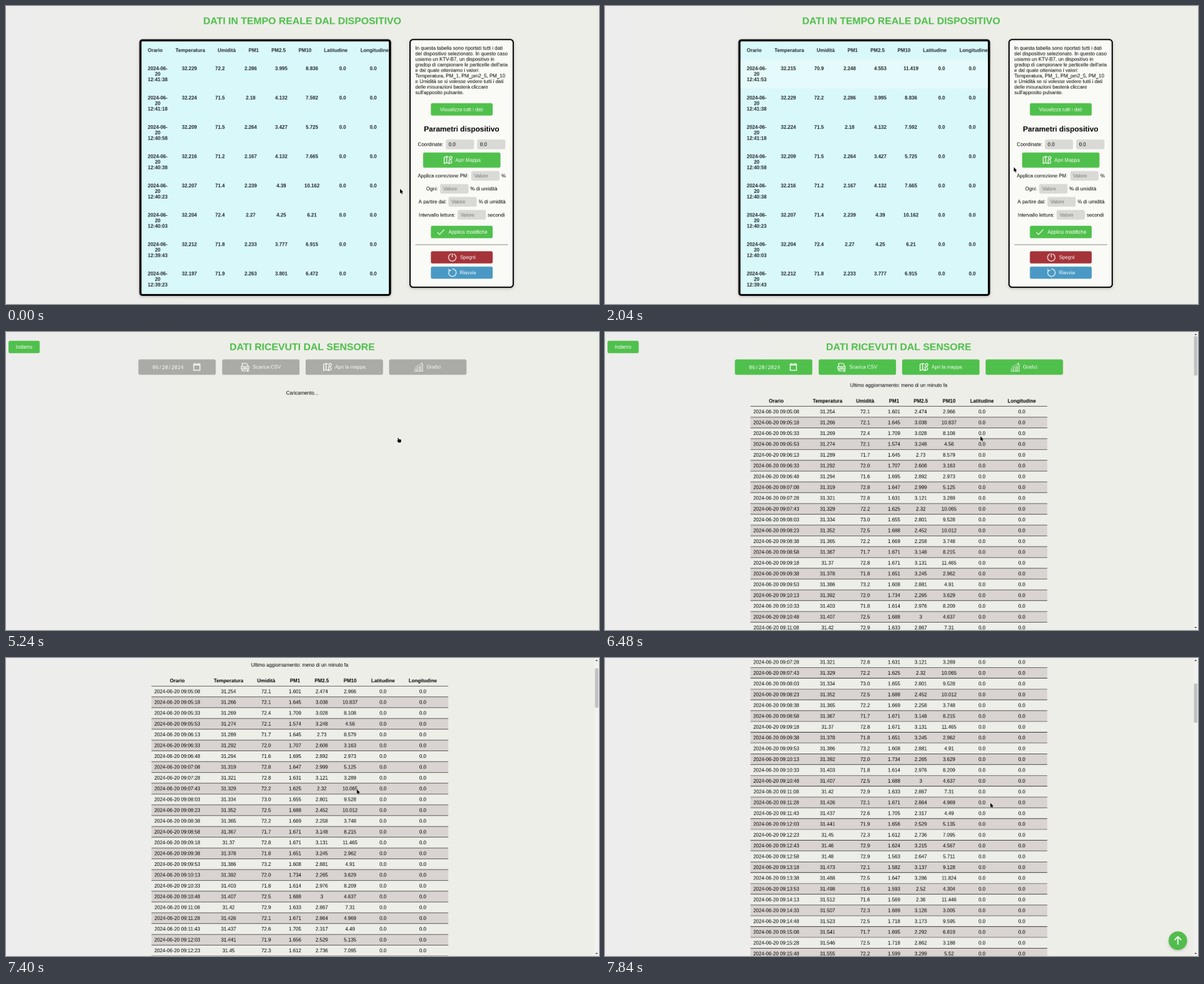
These frames come from a looping animation (954 px wide and 480 px high, 8 s). An HTML page with a canvas:

```html
<!DOCTYPE html>
<html lang="it">
<head>
<meta charset="utf-8">
<title>Dati sensore</title>
<style>
html, body { margin: 0; width: 100%; height: 100%; overflow: hidden; background: #eeeee9; }
canvas { display: block; width: 954px; height: 480px; }
</style>
</head>
<body>
<canvas id="stage" width="954" height="480"></canvas>
<script>
const W = 954, H = 480, LOOP = 8000;
// The page is drawn at full screen size, then reduced to the stage
const SS = 1920 / W, SIZE = 16 / SS;
const SANS = '"Liberation Sans", Arial, sans-serif';
const MONO = '"Noto Sans Mono", "DejaVu Sans Mono", monospace';
const GREEN = '#50c04c', TITLE = '#4abf47', GREY = '#aaaba7', WHITE = '#fafaf8';

const stage = document.getElementById('stage').getContext('2d');
stage.imageSmoothingQuality = 'high';
const page = document.createElement('canvas');
page.width = Math.round(W * SS);
page.height = Math.round(H * SS);
const ctx = page.getContext('2d');

const HEADS = ['Orario', 'Temperatura', 'Umidità', 'PM1', 'PM2.5', 'PM10', 'Latitudine', 'Longitudine'];
const LIVE_HEAD_X = [240, 296.5, 355, 398.5, 438.5, 481, 530.5, 593];
const LOG_X = [275.5, 358, 418.5, 465, 508, 553.5, 606.5, 670.5];
const LOG_ROWS = 36, PITCH = 35 / SS;

const clamp = v => Math.max(0, Math.min(1, v));
const mix = (a, b, p) => a.map((v, i) => v + (b[i] - v) * p);
const rgb = c => `rgb(${c.map(Math.round)})`;

// Repeatable noise in 0..1
function noise(seed) {
  const v = Math.sin(seed * 127.1) * 43758.5453;
  return v - Math.floor(v);
}

const two = n => String(n).padStart(2, '0');
function clock(h, m, s) {
  const all = h * 3600 + m * 60 + s;
  return [all / 3600, all / 60 % 60, all % 60].map(v => two(Math.floor(v))).join(':');
}

// One measurement: drifting temperature, noisy humidity and dust
function reading(time, seed, temp, humidity, dust) {
  const n = k => noise(seed * 5 + k);
  const short = v => String(+v.toFixed(3));
  return [
    time,
    short(temp + (n(1) - 0.5) * 0.02),
    (humidity + n(2) * 1.7).toFixed(1),
    short(dust + n(3) * 0.2),
    short(dust * 2 - 0.9 + n(4) * dust * 0.7),
    short(dust * 3.5 - 2.5 + n(5) ** 2 * 9),
    '0.0', '0.0'
  ];
}

const live = Array.from({ length: 9 }, (_, i) =>
  reading(clock(12, 41, 53 - 5 * Math.floor(3.75 * i)), i + 100, 32.223 - i * 0.002, 70.8, 2.15));
const log = Array.from({ length: LOG_ROWS }, (_, i) =>
  reading('2024-06-20 ' + clock(9, 5, 8 + 5 * Math.max(0, Math.round(3.7 * i - 2))), i + 1, 31.253 + i * 0.0085, 71.5, 1.56));

const INFO = [
  'In questa tabella sono riportati tutti i dati',
  'del dispositivo selezionato. In questo caso',
  'usiamo un KTV-B7, un dispositivo in',
  "gradop di campionare le particelle dell'aria",
  'e dal quale otteniamo i valori:',
  'Temperatura, PM_1, PM_pm2_5, PM_10',
  'e Umidità se si volesse vedere tutti i dati',
  'delle misurazioni basterà cliccare',
  "sull'apposito pulsante."
];

// Icons are centred on 0,0: [path, line width]
const ICONS = {
  map: ['M1 -5 L-2 -6 L-6 -4.5 V5.5 L-2 4 L2 5.5 L6 4 V1 M-2 -6 V4 M2 -1 V5.5 M4.5 0 L2.7 -3 A2 2 0 1 1 6.3 -3 Z', 1.3],
  check: ['M-5.5 0.5 L-2 4 L5.5 -4', 1.2],
  power: ['M-2 -5.6 A6 6 0 1 0 2 -5.6 M0 -6.5 V0', 1.2],
  restart: ['M-4.6 -3.6 A6 6 0 1 0 0 -6 M-6 -6 L-4.6 -3 L-1.6 -4', 1.2],
  calendar: ['M-5 -4.5 H5 V5.5 H-5 Z M-5 -3 H5 M-3 -6 V-4 M3 -6 V-4', 1.3],
  file: ['M-4.5 -1.5 V-6 H2 L4.5 -3.5 V-1.5 M-6 -1 H6 V3 H-6 Z M-4.5 3 V6 H2 M4.5 3 V7 M2.8 5.4 L4.5 7 L6.2 5.4 M-4 1 H4', 1.2],
  chart: ['M-6.5 6.5 V3 H-4 V6.5 M-2.5 6.5 V0.5 H0 V6.5 M1.5 6.5 V-1 H3.5 V6.5 M5 6.5 V-4 H6.7 V6.5 M-7 6.7 H7 M-6 0.5 L-1.5 -2.5 L1 -3 L5.5 -6.5 M3 -6.5 H5.7 V-4', 0.6],
  up: ['M0 6.5 V-6 M-5.5 -0.8 L0 -6.3 L5.5 -0.8', 1.9]
};
for (const k in ICONS) ICONS[k][0] = new Path2D(ICONS[k][0]);
const ARROW = new Path2D('M0 0 V7.3 L1.7 5.8 L2.9 8.5 L4.1 8 L2.9 5.3 H5.2 Z');
const HAND = new Path2D('M0 .4 Q.7 -.4 1.3 .6 L1.8 2.2 L5 2.6 Q6 3 5.7 4.8 L5 7.6 H1.4 L-.9 4.8 Q-.6 3.6 .8 4.5 Z');

// Piecewise linear track of [time, ...values]
function track(keys, t) {
  let i = 0;
  while (i < keys.length - 1 && keys[i + 1][0] <= t) i++;
  const a = keys[i], b = keys[i + 1];
  return b ? mix(a.slice(1), b.slice(1), clamp((t - a[0]) / (b[0] - a[0]))) : a.slice(1);
}

const LIVE_POINTER = [[1920, 634, 294.5], [2280, 705, 190], [2560, 718.5, 166.5]];
const LOG_POINTER = [
  [5240, 630, 170.5], [5320, 604, 168], [6480, 604, 168],
  [7040, 394, 147], [7160, 394, 147], [7400, 564.5, 211.5], [7840, 620, 233.5]
];
const SCROLL = [[6960, 0], [7040, 8.4], [7160, 8.4], [7400, 74.5], [7840, 261]];

function text(str, x, y, o = {}) {
  const size = (o.size || SIZE) * SS;
  ctx.save();
  ctx.setTransform(1, 0, 0, 1, 0, 0);
  ctx.font = `${o.bold ? 'bold ' : ''}${size}px ${o.font || SANS}`;
  ctx.letterSpacing = `${o.spacing || 0}px`;
  ctx.textAlign = o.align || 'center';
  ctx.fillStyle = o.color || '#000';
  ctx.fillText(str, x * SS, Math.round(y * SS + size * 0.345));
  ctx.restore();
}
const left = (str, x, y, color) => text(str, x, y, { align: 'left', color });

function rect(x, y, w, h, fill) {
  ctx.fillStyle = fill;
  ctx.fillRect(x, y, w, h);
}

function box(x, y, w, h, r, fill) {
  ctx.beginPath();
  ctx.roundRect(x, y, w, h, r);
  ctx.fillStyle = fill;
  ctx.fill();
}

function withShadow(draw) {
  ctx.save();
  ctx.shadowColor = 'rgba(0,0,0,.2)';
  ctx.shadowBlur = 4 * SS;
  ctx.shadowOffsetY = 1.5 * SS;
  draw();
  ctx.restore();
}

function icon(name, x, y) {
  const [path, width] = ICONS[name];
  ctx.save();
  ctx.translate(x, y);
  ctx.strokeStyle = WHITE;
  ctx.lineWidth = width;
  ctx.stroke(path);
  ctx.restore();
}

function button(x, y, w, h, fill, label, textX, iconName, iconX) {
  box(x, y, w, h, 2.5, fill);
  const cy = y + h / 2;
  if (iconName) {
    icon(iconName, iconX, cy);
    left(label, textX, cy, WHITE);
  } else text(label, textX, cy, { color: WHITE });
}

function field(x, y, value, color) {
  box(x, y - 7.8, 45.5, 15.5, 2.5, '#d9d9d6');
  left(value, x + 4.7, y, color);
}

function title(str, x, y) {
  text(str, x, y, { size: SIZE * 2, bold: true, color: TITLE });
}

function background() {
  const g = ctx.createLinearGradient(0, 0, W, 0);
  g.addColorStop(0, '#ededed');
  g.addColorStop(0.2, '#ededec');
  g.addColorStop(0.3, '#eeeee9');
  rect(0, 0, W, H + 1, g);
}

function liveTable(t) {
  withShadow(() => box(214.5, 53.5, 405, 413.5, 5, '#000'));
  box(218, 57, 398, 407, 1.5, '#d9f8fa');
  if (t >= 880) {
    const p = clamp((t - 1400) / 920);
    rect(218, 86, 398, 47, rgb(mix([255, 255, 251], [217, 248, 250], p)));
  }
  ctx.save();
  ctx.beginPath();
  ctx.rect(218, 57, 398, 407);
  ctx.clip();
  const ink = { bold: true, color: '#212529' };
  HEADS.forEach((h, i) => text(h, LIVE_HEAD_X[i], 71.5, ink));
  const first = t < 880 ? 1 : 0;
  live.slice(first, first + 8).forEach((row, r) => {
    const y = 100.6 + r * 47.22;
    text('2024-06-', 244, y, ink);
    text('20', 244, y + 9, ink);
    row.forEach((v, i) => text(v, i ? 245.7 + 49.3 * i : 244, i ? y : y + 18, ink));
  });
  ctx.restore();
}

function panel(t) {
  withShadow(() => box(649, 53, 168, 401, 6, '#000'));
  box(651, 55, 164, 397, 4, '#fafaf6');
  INFO.forEach((line, i) => left(line, 658.5, 67.6 + i * 8.94));

  const hover = clamp((t - 2440) / 440);
  button(683.5, 156.5, 99.5, 20, rgb(mix([80, 192, 76], [69, 172, 67], hover)), 'Visualizza tutti i dati', 733);
  text('Parametri dispositivo', 733, 198, { size: SIZE * 1.5, bold: true });

  left('Coordinate:', 662.5, 223);
  field(707.5, 223, '0.0');
  field(758, 223, '0.0');
  button(671, 236, 124.5, 24.5, GREEN, 'Apri Mappa', 723, 'map', 711);

  const setting = (label, x, y, fieldX, unit) => {
    left(label, x, y);
    field(fieldX, y, 'Valore', '#777');
    left(unit, fieldX + 48.5, y);
  };
  setting('Applica correzione PM:', 662.5, 273.6, 748.5, '%');
  setting('Ogni:', 676, 294.5, 698.5, '% di umidità');
  setting('A partire dal:', 663.7, 315.4, 711.8, '% di umidità');
  setting('Intervallo lettura:', 664, 336.4, 726.5, 'secondi');

  button(683.5, 354, 99.5, 20, GREEN, 'Applica modifiche', 712, 'check', 699.5);
  rect(658.5, 384, 149.5, 1, '#8a8a88');
  button(683.5, 395, 99.5, 19.7, '#a5333a', 'Spegni', 730.5, 'power', 718);
  button(683.5, 419.7, 99.5, 19.7, '#4a99c4', 'Riavvia', 730, 'restart', 718);
}

function toolbar(dx, dy, fill) {
  title('DATI RICEVUTI DAL SENSORE', 476.5 + dx, 24 + dy);
  const y = 44.2 + dy, w = 124.5, h = 24.8;
  box(213 + dx, y, w, h, 2.5, fill);
  text('06/20/2024', 235.8 + dx, y + 12.5, { font: MONO, align: 'left', color: WHITE, spacing: 0.5 });
  icon('calendar', 307 + dx, y + 12);
  button(347.7 + dx, y, w, h, fill, 'Scarica CSV', 397 + dx, 'file', 384.5 + dx);
  button(482 + dx, y, w, h, fill, 'Apri la mappa', 529.3 + dx, 'map', 517 + dx);
  button(616.3 + dx, y, w, h, fill, 'Grafici', 676.5 + dx, 'chart', 664 + dx);
}

function logTable(dy) {
  text('Ultimo aggiornamento: meno di un minuto fa', 472.5, 85.6 + dy);
  HEADS.forEach((h, i) => text(h, LOG_X[i], 111 + dy, { bold: true }));
  const top = 119.7 + dy;
  log.forEach((row, r) => {
    const y = top + r * PITCH;
    if (r % 2) rect(234, y, 477.5, PITCH, '#d9d4d1');
    row.forEach((v, i) => text(v, LOG_X[i], y + 8.7));
  });
  for (let r = 0; r <= LOG_ROWS; r++) rect(234, top + r * PITCH - 0.3, 477.5, 0.6, '#000');
}

function triangle(x, y, d) {
  ctx.beginPath();
  ctx.moveTo(x - 2, y + d);
  ctx.lineTo(x + 2, y + d);
  ctx.lineTo(x, y - d);
  ctx.fillStyle = '#484848';
  ctx.fill();
}

function scrollbar(scroll) {
  rect(946.5, 0, 7.5, H, '#f1f1f0');
  rect(947.5, 7 + scroll * 0.131, 5.5, 63, '#c1c1c1');
  triangle(950.2, 3.7, 1.2);
  triangle(950.2, 476.2, -1.2);
}

function logPage(t) {
  const loaded = t >= 6080;
  const scroll = track(SCROLL, t)[0];
  button(4, 14.2 - scroll, 50.3, 20, GREEN, 'Indietro', 29);
  toolbar(loaded ? -4 : 0, -scroll, loaded ? GREEN : GREY);
  if (!loaded) {
    text('Caricamento...', 476.5, 98.3);
    return;
  }
  logTable(-scroll);
  scrollbar(scroll);
  if (scroll > 100) {
    withShadow(() => box(906.7, 440.4, 29.8, 29.8, 14.9, '#50bd4c'));
    icon('up', 921.6, 455.2);
  }
}

function pointer(x, y, shape) {
  ctx.save();
  ctx.translate(x, y);
  ctx.lineJoin = 'round';
  ctx.lineWidth = 1;
  ctx.strokeStyle = 'rgba(255,255,255,.8)';
  ctx.stroke(shape);
  ctx.fillStyle = '#000';
  ctx.fill(shape);
  ctx.restore();
}

function draw(now) {
  const t = Math.floor((now % LOOP) / 40) * 40;
  ctx.setTransform(SS, 0, 0, SS, 0, 0);
  background();
  if (t < 5240) {
    title('DATI IN TEMPO REALE DAL DISPOSITIVO', 476.5, 24);
    liveTable(t);
    panel(t);
    pointer(...track(LIVE_POINTER, t), ARROW);
  } else {
    logPage(t);
    pointer(...track(LOG_POINTER, t), t < 5320 ? HAND : ARROW);
  }
  stage.drawImage(page, 0, 0, W, H);
}

const start = performance.now();
function tick() {
  draw(performance.now() - start);
  requestAnimationFrame(tick);
}
tick();
</script>
</body>
</html>
```
